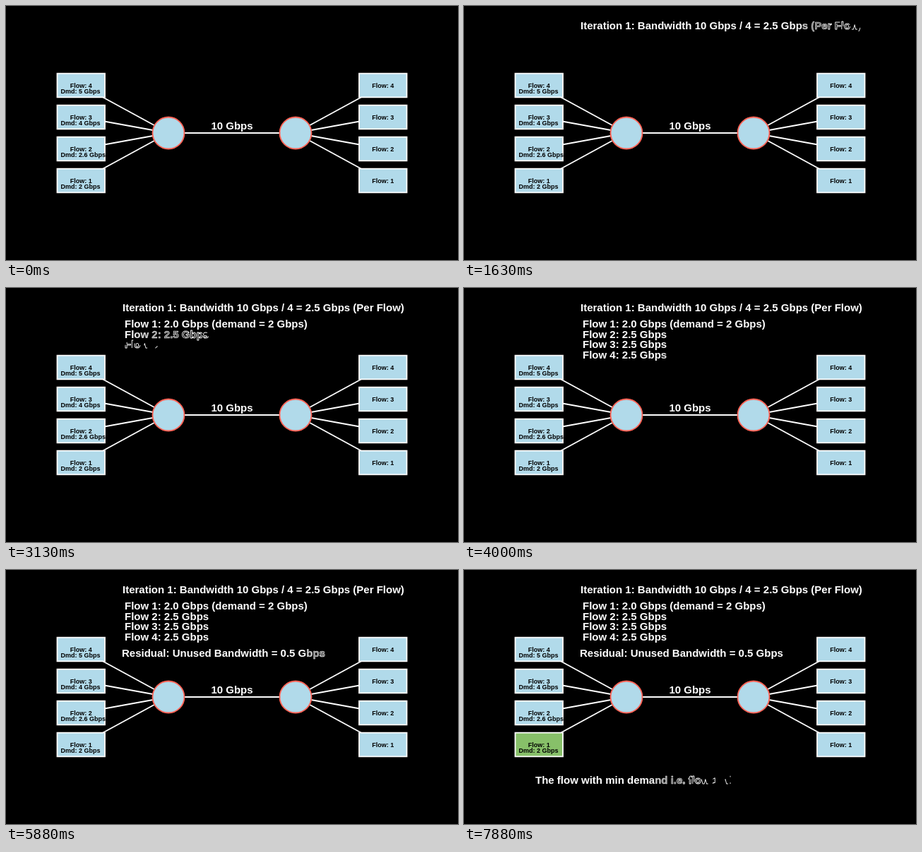
Recreate the animation shown at these times as an HTML page with a canvas. Size 640 px wide and 360 px high, loop 8000 ms.

```html
<!DOCTYPE html>
<html lang="en">
<head>
<meta charset="utf-8">
<title>Fair bandwidth sharing</title>
<style>
  html, body { margin: 0; width: 100%; height: 100%; overflow: hidden; background: #000; }
  canvas { display: block; }
</style>
</head>
<body>
<canvas id="stage" width="640" height="360"></canvas>
<script>
const ctx = document.getElementById('stage').getContext('2d');
const LOOP = 8000, STEP = 125;
const BLUE = '#b1daea', GREEN = '#87c069', RED = '#fc6255';
const LEFT = 106.25, RIGHT = 533.75, NODES = [230, 410], MID = 180;
const BOX_W = 67.5, BOX_H = 33.75, LINE = 1.8;
const BIG = 15, SMALL = 9, BOX_START = 6.005;
const flows = [[4, '5'], [3, '4'], [2, '2.6'], [1, '2']]
  .map(([id, demand], i) => ({ id, demand, y: 112.5 + 45 * i }));

// Each caption: start in seconds, then its lines as [text, x, baseline].
const captions = [
  { start: 0, lines: [['Iteration 1: Bandwidth 10 Gbps / 4 = 2.5 Gbps (Per Flow)', 165, 32.8]] },
  { start: 2.025, lines: [
    ['Flow 1: 2.0 Gbps (demand = 2 Gbps)', 168, 55.6],
    ['Flow 2: 2.5 Gbps', 168, 70.5],
    ['Flow 3: 2.5 Gbps', 168, 85.4],
    ['Flow 4: 2.5 Gbps', 168, 100.2]] },
  { start: 4.02, lines: [['Residual: Unused Bandwidth = 0.5 Gbps', 164, 122.8]] },
  { start: 6.98, lines: [['The flow with min demand i.e. flow 1 will be removed from the flows.', 101, 303.4]] }
];

const clamp = v => Math.min(1, Math.max(0, v));

function setFont(size) {
  ctx.font = `bold ${size}px "Liberation Sans", Arial, sans-serif`;
}

function text(str, x, y, size, color, align = 'left') {
  setFont(size);
  ctx.textAlign = align;
  ctx.fillStyle = color;
  ctx.fillText(str, x, y);
}

function line(x1, y1, x2, y2) {
  ctx.strokeStyle = '#fff';
  ctx.lineWidth = LINE;
  ctx.beginPath();
  ctx.moveTo(x1, y1);
  ctx.lineTo(x2, y2);
  ctx.stroke();
}

// Outline grows during the first half, fill fades in during the second.
function box(x, y, color, p = 1) {
  const r = x + BOX_W / 2, l = x - BOX_W / 2, t = y - BOX_H / 2, b = y + BOX_H / 2;
  const fill = clamp(2 * p - 1), length = 2 * (BOX_W + BOX_H);
  ctx.beginPath();
  ctx.moveTo(r, t);
  ctx.lineTo(l, t);
  ctx.lineTo(l, b);
  ctx.lineTo(r, b);
  ctx.closePath();
  ctx.globalAlpha = fill;
  ctx.fillStyle = color;
  ctx.fill();
  ctx.globalAlpha = 1;
  if (p <= 0) return;
  if (p < 0.5) ctx.setLineDash([2 * p * length, length]);
  ctx.strokeStyle = '#fff';
  ctx.lineWidth = LINE * (1 + fill) / 2;
  ctx.stroke();
  ctx.setLineDash([]);
}

function glyph(ch, x, y, p) {
  const fill = clamp(2 * p - 1);
  if (fill > 0) {
    ctx.globalAlpha = fill;
    ctx.fillText(ch, x, y);
    ctx.globalAlpha = 1;
  }
  if (fill >= 1) return;
  if (p < 0.5) {
    const outline = BIG + 3 * ctx.measureText(ch).width;
    ctx.setLineDash([2 * p * outline, 1000]);
  }
  ctx.lineWidth = 0.9 * (1 - fill);
  ctx.strokeText(ch, x, y);
  ctx.setLineDash([]);
}

// Writes the glyphs one after another, overlapping, over two seconds.
function write({ start, lines }, now) {
  const count = lines.map(l => l[0]).join('').replace(/ /g, '').length;
  const lag = Math.min(4 / (count + 1), 0.2);
  const span = 2 / (1 + lag * (count - 1));
  let index = 0;
  setFont(BIG);
  ctx.textAlign = 'left';
  ctx.fillStyle = ctx.strokeStyle = '#fff';
  ctx.lineJoin = 'round';
  for (const [str, x, y] of lines) {
    for (let i = 0; i < str.length; i++) {
      if (str[i] === ' ') continue;
      const p = clamp((now - start) / span - lag * index++);
      if (p > 0) glyph(str[i], x + ctx.measureText(str.slice(0, i)).width, y, p);
    }
  }
  ctx.lineJoin = 'miter';
}

function draw(now) {
  ctx.fillStyle = '#000';
  ctx.fillRect(0, 0, 640, 360);

  for (const { y } of flows) {
    line(LEFT, y, NODES[0], MID);
    line(RIGHT, y, NODES[1], MID);
  }
  line(NODES[0], MID, NODES[1], MID);
  for (const x of NODES) {
    ctx.beginPath();
    ctx.arc(x, MID, 22.5, 0, 2 * Math.PI);
    ctx.fillStyle = BLUE;
    ctx.fill();
    ctx.strokeStyle = RED;
    ctx.lineWidth = LINE;
    ctx.stroke();
  }
  text('10 Gbps', 320, 175, BIG, '#fff', 'center');

  for (const { id, demand, y } of flows) {
    if (id === 1 && now >= BOX_START) box(LEFT, y, GREEN, clamp(now - BOX_START));
    else box(LEFT, y, BLUE);
    box(RIGHT, y, BLUE);
    text(`Flow: ${id}`, LEFT, y + 3.2, SMALL, '#000', 'center');
    text(`Dmd: ${demand} Gbps`, 77.4, y + 11.4, SMALL, '#000');
    text(`Flow: ${id}`, RIGHT, y + 3.2, SMALL, '#000', 'center');
  }
  for (const caption of captions) write(caption, now);
}

const begin = performance.now();
function tick() {
  const t = (performance.now() - begin) % LOOP;
  draw(Math.floor(t / STEP) * STEP / 1000);
  requestAnimationFrame(tick);
}
tick();
</script>
</body>
</html>
```
